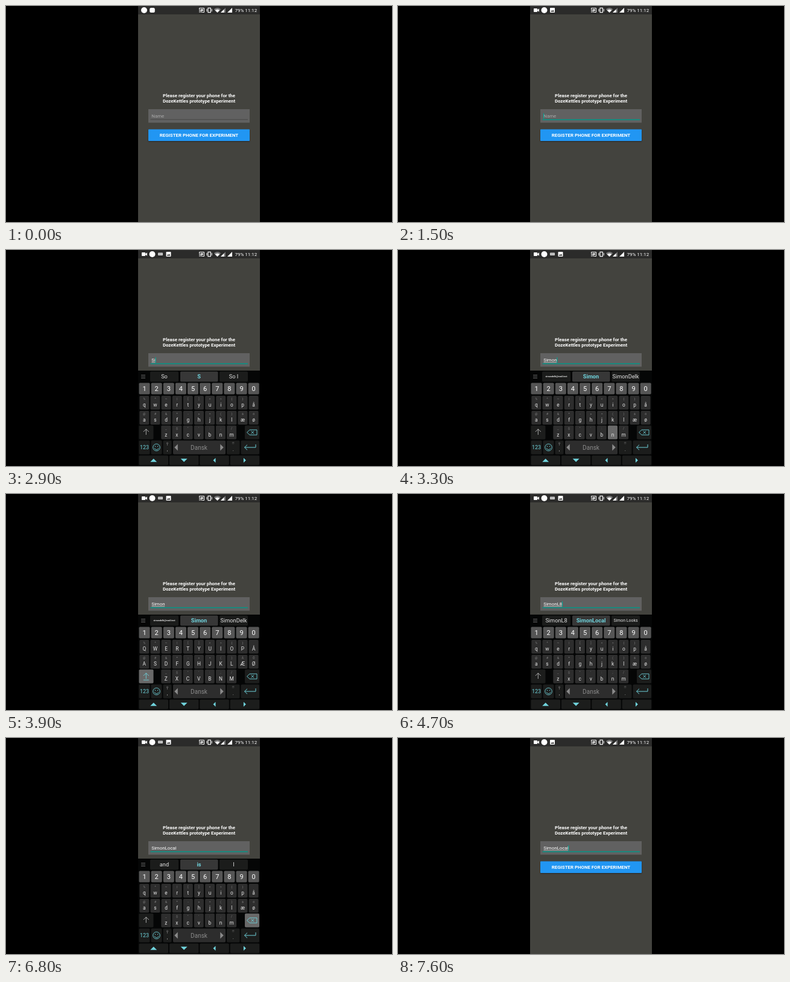
An HTML page with a canvas for the animation above (8000 ms loop, 640x360 px).

```html
<!DOCTYPE html>
<html lang="en">
<head>
<meta charset="utf-8">
<title>Phone registration</title>
<style>
html, body { margin: 0; width: 100%; height: 100%; overflow: hidden; background: #000; }
canvas { display: block; width: 640px; height: 360px; }
</style>
</head>
<body>
<canvas id="stage"></canvas>
<script>
const LOOP = 8000, STEP = 100, KEYBOARD_TOP = 201;
const TEAL = '#009688', CYAN = '#6fd3dc', WHITE = '#fff';
const canvas = document.getElementById('stage');
const ctx = canvas.getContext('2d');
const ratio = window.devicePixelRatio || 1;
canvas.width = 640 * ratio;
canvas.height = 360 * ratio;

const clamp = v => Math.max(0, Math.min(1, v));
const mix = (a, b, k) => a + (b - a) * k;

// Suggestions: left, middle, right
const START = ['I', 'The', 'This'];
const FIRST = ['So', 'S', 'So I'];
const NAME = ['simondelk@mail.test', 'Simon', 'SimonDelk'];
const LONG = ['SimonL', 'SimonLocal', 'Simon Looks'];
const TYPO = ['SimonL8', 'SimonLocal', 'Simon Looks'];
const NEXT = ['and', 'is', 'I'];

// Start time, text, capitals, suggestions, pressed key
const states = [
  [0, '', true, START],
  [1500, '', true, START],
  [2400, '', true, START, 's'],
  [2500, 'S', false, START],
  [2600, 'S', false, FIRST],
  [2800, 'S', false, FIRST, 'i'],
  [2900, 'Si', false, FIRST],
  [3000, 'Sim', false, FIRST, 'm'],
  [3100, 'Simo', false, NAME, 'o'],
  [3200, 'Simon', false, NAME, 'n'],
  [3400, 'Simon', false, NAME],
  [3900, 'Simon', true, NAME, 'shift'],
  [4100, 'Simon', true, NAME, 'l'],
  [4200, 'SimonL', false, NAME],
  [4300, 'SimonL', false, LONG],
  [4600, 'SimonL', false, LONG, '8'],
  [4700, 'SimonL8', false, TYPO],
  [5000, 'SimonL8', false, TYPO, 'pick'],
  [5100, 'SimonLocal ', false, TYPO],
  [5200, 'SimonLocal ', false, NEXT],
  [6800, 'SimonLocal ', false, NEXT, 'back'],
  [6900, 'SimonLocal', false, LONG],
  [7500, 'SimonLocal', false, LONG]
];
const cursorResets = [1500, 2500, 2900, 3000, 3100, 3200, 3400, 4200, 4700, 5200, 6900, 7500];

function rect(x, y, w, h, color, radius = 0) {
  ctx.fillStyle = color;
  ctx.beginPath();
  ctx.roundRect(x, y, w, h, radius);
  ctx.fill();
}

function shape(points, color) {
  ctx.fillStyle = color;
  ctx.beginPath();
  points.forEach(([x, y]) => ctx.lineTo(x, y));
  ctx.fill();
}

function line(points, color, width = 1) {
  ctx.strokeStyle = color;
  ctx.lineWidth = width;
  ctx.beginPath();
  points.forEach(([x, y]) => ctx.lineTo(x, y));
  ctx.stroke();
}

function circle(x, y, r, color, stroke) {
  ctx.beginPath();
  ctx.arc(x, y, r, 0, Math.PI * 2);
  if (stroke) {
    ctx.strokeStyle = color;
    ctx.lineWidth = stroke;
    ctx.stroke();
  } else {
    ctx.fillStyle = color;
    ctx.fill();
  }
}

function text(str, x, middle, size, color = WHITE, weight = 400, align = 'center') {
  ctx.font = `${weight} ${size}px Roboto, sans-serif`;
  ctx.textAlign = align;
  ctx.fillStyle = color;
  ctx.fillText(str, x, middle + size * 0.355);
}

function faded(alpha, draw) {
  ctx.save();
  ctx.globalAlpha *= alpha;
  draw();
  ctx.restore();
}

function cameraIcon(x) {
  rect(x - 4.5, 4, 6.2, 6, WHITE, 0.8);
  shape([[x + 1.5, 6.5], [x + 4.5, 4.2], [x + 4.5, 9.8], [x + 1.5, 7.5]], WHITE);
}

function pictureIcon(x) {
  rect(x - 4, 3, 8, 8, WHITE, 1);
  shape([[x - 3, 9.5], [x - 1.3, 7.2], [x - 0.2, 8.4], [x + 1.2, 6.5], [x + 3, 9.5]], '#2b2b2a');
}

function keyboardIcon(x) {
  rect(x - 4, 4.5, 8, 4.6, '#ddd', 0.8);
  for (let i = 0; i < 4; i++) {
    rect(x - 3 + i * 1.7, 5.5, 0.7, 0.7, '#333');
    rect(x - 3 + i * 1.7, 7, 0.7, 0.7, '#333');
  }
}

function statusBar(t) {
  rect(219, 0, 202, 14, '#2b2b2a');
  const k = clamp(t / 300);
  const typing = t >= 1700 && t < 7500;
  faded(k, () => cameraIcon(229.5));
  circle(mix(229, 242.5, k), 7, 5, WHITE);
  const last = typing ? 269.5 : mix(242.5, 256, k);
  faded(1 - k, () => rect(last - 4.3, 3, 8.6, 8, WHITE, 2.5));
  faded(k, () => pictureIcon(last));
  if (typing) keyboardIcon(256);

  // Cast
  line([[320.5, 5.5], [320.5, 3.5], [328.5, 3.5], [328.5, 10.5], [325.5, 10.5]], WHITE);
  for (const r of [1.3, 3.3, 5]) {
    ctx.beginPath();
    ctx.arc(320, 11, r, -Math.PI / 2, 0);
    ctx.lineWidth = 0.9;
    ctx.stroke();
  }
  rect(323, 5.2, 4, 3, '#ddd');
  // Vibrate
  ctx.strokeStyle = WHITE;
  ctx.lineWidth = 1.2;
  ctx.strokeRect(335, 3.3, 4.2, 7.4);
  for (const x of [333, 341.2]) line([[x, 4.8], [x, 9.2]], WHITE);
  // Wireless
  for (const [r, color] of [[8, '#777'], [5.3, WHITE]]) {
    ctx.fillStyle = color;
    ctx.beginPath();
    ctx.moveTo(350.5, 11);
    ctx.arc(350.5, 11, r, -Math.PI * 0.76, -Math.PI * 0.24);
    ctx.fill();
  }
  // Signal
  shape([[356, 11], [364, 11], [364, 3]], '#777');
  shape([[356, 11], [361.5, 11], [361.5, 5.5]], WHITE);
  shape([[367, 11], [375, 11], [375, 3]], WHITE);
  text('79% 11:12', 379.5, 7.2, 8, WHITE, 400, 'left');
}

function form(t, value) {
  rect(219, 14, 202, 346, '#43433e');
  text('Please register your phone for the', 320, 149.3, 7.85, WHITE, 700);
  text('DozeKettles prototype Experiment', 320, 158.6, 7.85, WHITE, 700);

  const focused = t >= 1500;
  rect(236, 172, 168, 22.5, '#616161');
  if (focused) rect(239.5, 188.7, 161.5, 1.6, TEAL);
  else rect(239.5, 188.8, 161.5, 0.8, '#3e3e3c');

  text(value || 'Name', 241.3, 183.3, 7.85, value ? WHITE : '#a9a9a9', 400, 'left');
  const width = value ? ctx.measureText(value).width : 0;
  if (value && !value.endsWith(' ')) rect(241.5, 187, width - 0.5, 0.6, '#e8e8e8');
  const reset = cursorResets.filter(r => r <= t).pop();
  if (focused && Math.floor((t - reset + 20) / 510) % 2 === 0) {
    rect(241 + width, 178.8, 1.1, 9, '#00a896');
  }

  ctx.save();
  ctx.shadowColor = 'rgba(0,0,0,.45)';
  ctx.shadowBlur = 2 * ratio;
  ctx.shadowOffsetY = ratio;
  rect(236, 205.5, 168, 19.5, '#2196f3', 1);
  ctx.restore();
  text('REGISTER PHONE FOR EXPERIMENT', 320, 215.6, 7.85, WHITE, 700);
}

function key(x, y, w, h, color = '#2d2d2d') {
  rect(x, y, w, h, color, 1.8);
}

function suggestions(words, pressed) {
  for (const y of [208.5, 211, 213.5]) line([[224, y], [231, y]], '#777', 0.8);
  key(239, 202.5, 47, 17, '#1b1c1b');
  key(289, 202.5, 62.5, 17, pressed === 'pick' ? '#666' : '#373737');
  key(354, 202.5, 47, 17, '#1b1c1b');
  words.forEach((word, i) => {
    const size = word.length > 11 ? 3.8 : word.length > 10 ? 6.9 : 9.2;
    const weight = i === 1 || word.length > 11 ? 700 : 400;
    text(word, [262.5, 320, 377.5][i], 211, size, i === 1 ? CYAN : '#e4e4e4', weight);
  });
}

function letterRow(letters, hints, x, y, caps, pressed) {
  [...letters].forEach((letter, i) => {
    const cx = x + i * 18.13;
    key(cx - 8, y, 16, 23, pressed === letter ? '#696969' : '#2d2d2d');
    const hint = hints[i] || '';
    text(caps ? hint.toUpperCase() : hint, cx, y + 5, 5, '#858585');
    text(caps ? letter.toUpperCase() : letter, cx, y + 15.2, 8.3, '#e6e6e6');
  });
}

function arrow(x, y, angle, size, color) {
  ctx.save();
  ctx.translate(x, y);
  ctx.rotate(angle);
  shape([[-size, size * 0.5], [0, -size * 0.5], [size, size * 0.5]], color);
  ctx.restore();
}

function keyboard(caps, words, pressed) {
  rect(219, KEYBOARD_TOP, 202, 159, '#050606');
  suggestions(words, pressed);
  [...'1234567890'].forEach((digit, i) => {
    const x = 229.5 + i * 20.13;
    key(x - 9, 221.5, 18, 19, pressed === digit ? '#888' : '#555');
    text(digit, x, 231.2, 11, WHITE);
  });
  letterRow('qwertyuiopå', '%^~|[]<>{}', 229.3, 243, caps, pressed);
  letterRow('asdfghjklæø', '@#&*-+=()äö', 229.3, 268, caps, pressed);
  letterRow('zxcvbnm', '_$"\':;/', 265.3, 292.5, caps, pressed);

  key(220.5, 292.5, 24, 23, pressed === 'shift' ? '#696969' : '#1c1d1c');
  const shiftColor = pressed === 'shift' ? CYAN : '#bbb';
  line([[232.3, 308], [232.3, 298.5]], shiftColor, 0.9);
  line([[227.8, 303], [232.3, 298.5], [236.8, 303]], shiftColor, 0.9);
  if (pressed === 'shift') line([[227.8, 310], [236.8, 310]], shiftColor, 0.9);

  key(396, 292.5, 24, 23, pressed === 'back' ? '#696969' : '#1c1d1c');
  line([[399.5, 304], [404, 299.8], [416, 299.8], [416, 308.2], [404, 308.2], [399.5, 304]], CYAN, 0.9);
  line([[406.5, 301.8], [411, 306.2]], CYAN, 0.9);
  line([[411, 301.8], [406.5, 306.2]], CYAN, 0.9);

  const bottom = [[220.5, 18], [240.5, 18], [260.5, 14], [277, 87], [366, 21.5], [389.5, 30.5]];
  bottom.forEach(([x, w], i) => key(x, 317.5, w, 23, i === 3 ? '#2d2d2d' : '#1c1d1c'));
  text('123', 229.5, 329, 9, CYAN);
  circle(249.5, 329, 5.8, CYAN, 0.9);
  circle(247.5, 327.3, 0.7, CYAN);
  circle(251.5, 327.3, 0.7, CYAN);
  ctx.beginPath();
  ctx.arc(249.5, 329.3, 3.4, 0.25, Math.PI - 0.25);
  ctx.stroke();
  circle(267.5, 322, 1.1, '#888', 0.6);
  line([[267.5, 323], [267.5, 326]], '#888', 0.6);
  text(',', 267.5, 332.5, 8, '#ccc');
  arrow(282, 329, -Math.PI / 2, 5.5, '#8a8a8a');
  arrow(358, 329, Math.PI / 2, 5.5, '#8a8a8a');
  text('Dansk', 320, 329, 10, '#8a8a8a');
  text('!?', 376.7, 322.5, 4.5, '#858585');
  text('.', 376.7, 332, 8, '#ccc');
  line([[414, 324], [414, 329], [395.5, 329]], CYAN);
  line([[400, 324.7], [395.5, 329], [400, 333.3]], CYAN);

  [0, Math.PI, -Math.PI / 2, Math.PI / 2].forEach((angle, i) => {
    const x = 220.5 + i * 50.4;
    key(x, 342.5, 48.5, 16, '#1c1d1c');
    arrow(x + 24.2, 350.6, angle, i < 2 ? 5.5 : 4, CYAN);
  });
}

function keyboardShown(t) {
  if (t < 7400) return 1 - (1 - clamp((t - 1500) / 450)) ** 2;
  return 1 - clamp((t - 7300) / 300) ** 1.5;
}

function render(now) {
  const t = Math.floor((now % LOOP) / STEP) * STEP;
  const [, value, caps, words, pressed] = states.filter(s => s[0] <= t).pop();
  ctx.setTransform(ratio, 0, 0, ratio, 0, 0);
  rect(0, 0, 640, 360, '#000');
  form(t, value);
  statusBar(t);
  const shown = keyboardShown(t);
  if (shown > 0) {
    ctx.save();
    ctx.translate(0, (1 - shown) * (360 - KEYBOARD_TOP));
    keyboard(caps, words, pressed);
    ctx.restore();
  }
}

let start;
function tick(now) {
  start ??= now;
  render(now - start);
  requestAnimationFrame(tick);
}
render(0);
requestAnimationFrame(tick);
</script>
</body>
</html>
```
